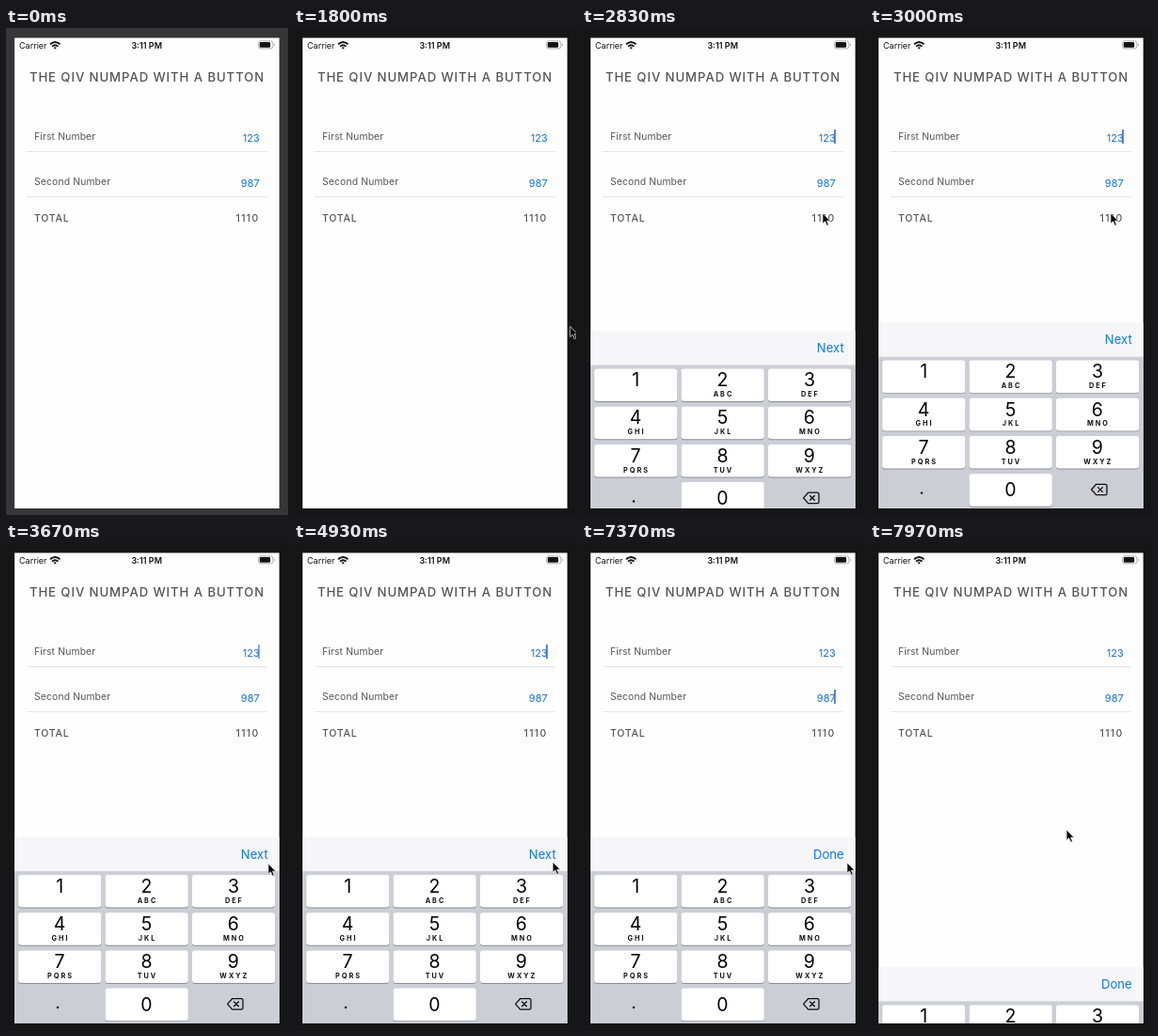
Recreate the animation shown at these times as an HTML page. Size 300x518 px, loop 8 s.

```html
<!DOCTYPE html>
<html lang="en">
<head>
<meta charset="utf-8">
<title>Numpad with a button</title>
<style>
  html, body { margin: 0; width: 100%; height: 100%; overflow: hidden; background: #161617; }
  svg { display: block; width: 100vw; height: 100vh; }
  text { font-family: Inter, Roboto, sans-serif; fill: #555; white-space: pre; }
  .end { text-anchor: end; }
  .mid { text-anchor: middle; }
  .status { font-size: 9px; fill: #111; }
  .title { font-size: 13.2px; letter-spacing: .9px; font-weight: 500; }
  .label { font-size: 10.3px; letter-spacing: .18px; }
  .total { font-size: 10.5px; letter-spacing: .8px; font-weight: 500; }
  .sum { letter-spacing: 1.3px; }
  .value { font-size: 11px; fill: #1672d8; }
  .action { font-size: 13.1px; fill: #0b78e3; }
  .digit { font-size: 19.5px; fill: #000; }
  .letters { font-size: 7.3px; font-weight: 700; letter-spacing: 2px; fill: #111; }
</style>
</head>
<body>
<svg viewBox="0 0 300 518" preserveAspectRatio="none">
  <defs>
    <clipPath id="screen"><rect x="9.1" y="10.5" width="281.6" height="500.6"/></clipPath>
  </defs>
  <rect id="desk" width="300" height="518"/>
  <g clip-path="url(#screen)">
    <rect x="9" y="10" width="282" height="502" fill="#fefefe"/>

    <text class="status" x="14" y="21.5">Carrier</text>
    <g fill="none" stroke="#111" stroke-width="1.9">
      <path d="M47 17.3Q52.2 12.7 57.4 17.3M49 19.6Q52.2 16.7 55.4 19.6"/>
      <path d="M50.6 20.9Q52.2 19.5 53.8 20.9L52.2 22.6Z" fill="#111" stroke="none"/>
    </g>
    <text class="status mid" x="149.7" y="21.5" font-weight="600">3:11 PM</text>
    <rect x="268.6" y="13.9" width="15.4" height="8" rx="2.3" fill="none" stroke="#999" stroke-width=".8"/>
    <rect x="269.8" y="15.1" width="11.4" height="5.6" rx="1.3" fill="#111"/>
    <path d="M285 16.4q1.6 1.5 0 3z" fill="#888"/>

    <text class="title mid" x="150" y="56.6">THE QIV NUMPAD WITH A BUTTON</text>
    <path d="M22 131.5H278M22 179.5H278" stroke="#e5e5e5"/>
    <text class="label" x="30" y="119">First Number</text>
    <text class="label" x="30" y="167">Second Number</text>
    <text class="value end" x="269.7" y="121">123</text>
    <text class="value end" x="269.7" y="169">987</text>
    <text class="total" x="30" y="206">TOTAL</text>
    <text class="total sum end" x="269.6" y="206">1110</text>
    <rect id="caret" x="268.2" width="1.6" height="15" fill="#3c63d6"/>

    <g id="pad">
      <rect x="9" width="282" height="36" fill="#f6f6f8"/>
      <rect x="9" y="36" width="282" height="165" fill="#cbced5"/>
      <text id="action" class="action end" x="278.7" y="22.6"></text>
      <g id="keys"></g>
      <circle cx="55" cy="181" r="1.2" fill="#000"/>
      <g fill="none" stroke="#111" stroke-width="1.3" stroke-linejoin="round" stroke-linecap="round">
        <path d="M235.6 177.4L240.6 171.7H250.4Q252 171.7 252 173.3V181.5Q252 183.1 250.4 183.1H240.6Z"/>
        <path d="M242.6 175L247.4 179.8M247.4 175L242.6 179.8"/>
      </g>
    </g>
  </g>
  <path id="mouse" d="M0 0V11.2L2.6 8.8L4.5 13.2L6.4 12.4L4.5 8.2H8Z" fill="#000" stroke="#fff" stroke-width=".7"/>
</svg>
<script>
const LOOP = 8000, WAKE = 1700, FOCUS = 2530, SWITCH = 5930, OPEN = 2579, CLOSE = 7842;
const TOP = 313, TRAVEL = 197;
const $ = id => document.getElementById(id);

// pointer stops: time, x, y
const PATH = [
  [1700, 296, 330], [2380, 259, 118], [2520, 259, 118], [2650, 256, 197], [3330, 256, 197],
  [3650, 279, 341], [4150, 276, 338], [4600, 278, 341], [5000, 275, 339], [5400, 280, 340],
  [5850, 259, 162], [6150, 259, 162], [6600, 269, 362], [6900, 276, 345], [7230, 282, 340],
  [7500, 282, 340], [7680, 266, 333], [7820, 266, 333], [7990, 207, 304]
];

const ROWS = ["1 ,2 ABC,3 DEF", "4 GHI,5 JKL,6 MNO", "7 PQRS,8 TUV,9 WXYZ"];

function key(x, y, digit, letters, dy = 18.8) {
  const box = (top, fill) =>
    `<rect x="${x}" y="${top}" width="88.3" height="34.6" rx="3" fill="${fill}"/>`;
  return box(y + 0.9, "#8b8d92") + box(y, "#fff") +
    `<text class="digit mid" x="${x + 44}" y="${y + dy}">${digit}</text>` +
    `<text class="letters mid" x="${x + 45}" y="${y + 29.7}">${letters}</text>`;
}

$("keys").innerHTML = ROWS.map((row, r) =>
  row.split(",").map((k, c) => key(13.1 + c * 92.4, 40 + r * 40.2, ...k.split(" "))).join("")
).join("") + key(105.5, 160.6, "0", "", 24);

const clamp = v => Math.min(1, Math.max(0, v));
const ease = u => u * u * (3 - 2 * u);

// share of the way left for a critically damped spring
function left(ms) {
  const u = Math.max(0, ms) * 0.019;
  return (1 + u) * Math.exp(-u);
}

function pointer(t) {
  const i = PATH.findIndex(p => p[0] > t);
  if (i < 0) return PATH[PATH.length - 1].slice(1);
  const [a, b] = [PATH[i - 1], PATH[i]];
  const u = ease((t - a[0]) / (b[0] - a[0]));
  return [a[1] + (b[1] - a[1]) * u, a[2] + (b[2] - a[2]) * u];
}

function blink(age) {
  const p = age % 1000;
  const rise = age < 1000 ? 1 : clamp(p / 200);
  return rise * clamp((770 - p) / 200);
}

function draw(now) {
  const t = now % LOOP, second = t >= SWITCH;
  $("desk").setAttribute("fill", t < WAKE ? "#363537" : "#161617");

  const hidden = t < CLOSE ? left(t - OPEN) : 1 - left(t - CLOSE);
  $("pad").setAttribute("transform", `translate(0 ${TOP + TRAVEL * hidden + (hidden > .999 ? 2 : 0)})`);
  $("action").textContent = second ? "Done" : "Next";

  const focused = t >= FOCUS && t < CLOSE;
  $("caret").setAttribute("y", second ? 156 : 108);
  $("caret").setAttribute("opacity", focused ? blink(t - (second ? SWITCH : FOCUS)) : 0);

  const shown = t >= WAKE;
  $("mouse").setAttribute("visibility", shown ? "visible" : "hidden");
  if (shown) $("mouse").setAttribute("transform", `translate(${pointer(t)})`);
}

const start = performance.now();
function tick() {
  draw(performance.now() - start);
  requestAnimationFrame(tick);
}
tick();
</script>
</body>
</html>
```
